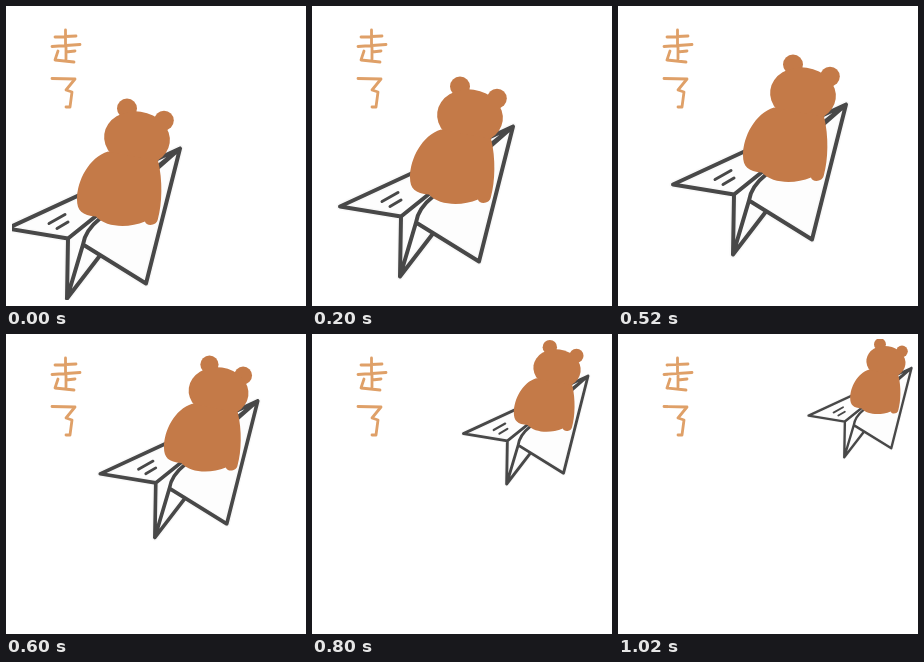
Write an HTML page that moves like this. It is 300 by 300 pixels and loops after 1100 ms.

```html
<!DOCTYPE html>
<html lang="zh">
<head>
<meta charset="utf-8">
<title>走了</title>
<style>
  html, body { margin: 0; width: 100%; height: 100%; overflow: hidden; background: #fff; }
  svg { display: block; width: 100vw; height: 100vh; }
  path { stroke-linecap: round; stroke-linejoin: round; }
  .lettering { fill: none; stroke: #dfa068; stroke-width: 2.8; }
  .paper { fill: #fdfdfd; stroke: #f8f8f8; stroke-width: 7; }
  .ink { fill: none; stroke: #484848; stroke-width: 4; }
  .thin { stroke-width: 3; }
  .fur { fill: #c47a48; }
</style>
</head>
<body>
<svg viewBox="0 0 300 300" role="img" aria-label="走了">
  <clipPath id="window"><rect x="6" y="5" width="289" height="289"/></clipPath>

  <g class="lettering">
    <path d="M49 31L70 30M59.500 24V40M46 40.500L74 38.500M60 40V53M60 46L69 45M52 45L49 54L68 56"/>
    <path d="M46 72.500L69 73L60 84L66 86L64 101H60"/>
  </g>

  <g clip-path="url(#window)">
    <!-- Origin at the nose of the plane -->
    <g id="flyer">
      <path class="paper" d="M-173 80L0 0L-34 135L-80 107L-113 150L-112 90Z"/>
      <path class="ink" d="M-112 90L-173 80L0 0L-34 135L-97 96Q-95 82 -80 70L0 0L-112 90L-113 150L-97 96M-113 150L-80 107"/>
      <path class="ink thin" d="M-131 75L-115 66M-123 80L-112 73.500"/>
      <g class="fur">
        <circle cx="-53" cy="-40" r="10"/>
        <circle cx="-16" cy="-28" r="9.800"/>
        <ellipse cx="-43" cy="-10" rx="33" ry="27" transform="rotate(8 -43 -10)"/>
        <path d="M-72 3C-91 9 -103 32 -103 51C-103 62 -98 67 -84 68C-74 79 -52 80 -35 73
                 C-34 78 -23 78 -22 70C-18 56 -17 32 -22 12Z"/>
      </g>
    </g>
  </g>
</svg>
<script>
  const LOOP = 1100;
  const CLIMB_STEPS = 3;
  // Nose position and size for each step into the distance
  const receding = [
    [251.7, 67, 0.91],
    [264, 57.5, 0.872],
    [276, 42, 0.72],
    [293.5, 34, 0.595],
  ];
  const flyer = document.getElementById('flyer');
  const start = performance.now();

  // Slow steady climb, then quicker steps; the last pose is held
  function poseAt(time) {
    const step = Math.floor(time / 200);
    if (step < CLIMB_STEPS) return [174 + 27 * step, 142.5 - 22 * step, 1];
    const quickStep = Math.floor((time - CLIMB_STEPS * 200) / 100);
    return receding[Math.min(quickStep, receding.length - 1)];
  }

  function draw() {
    const [x, y, size] = poseAt((performance.now() - start) % LOOP);
    flyer.setAttribute('transform', `translate(${x} ${y}) scale(${size})`);
    requestAnimationFrame(draw);
  }
  draw();
</script>
</body>
</html>
```
